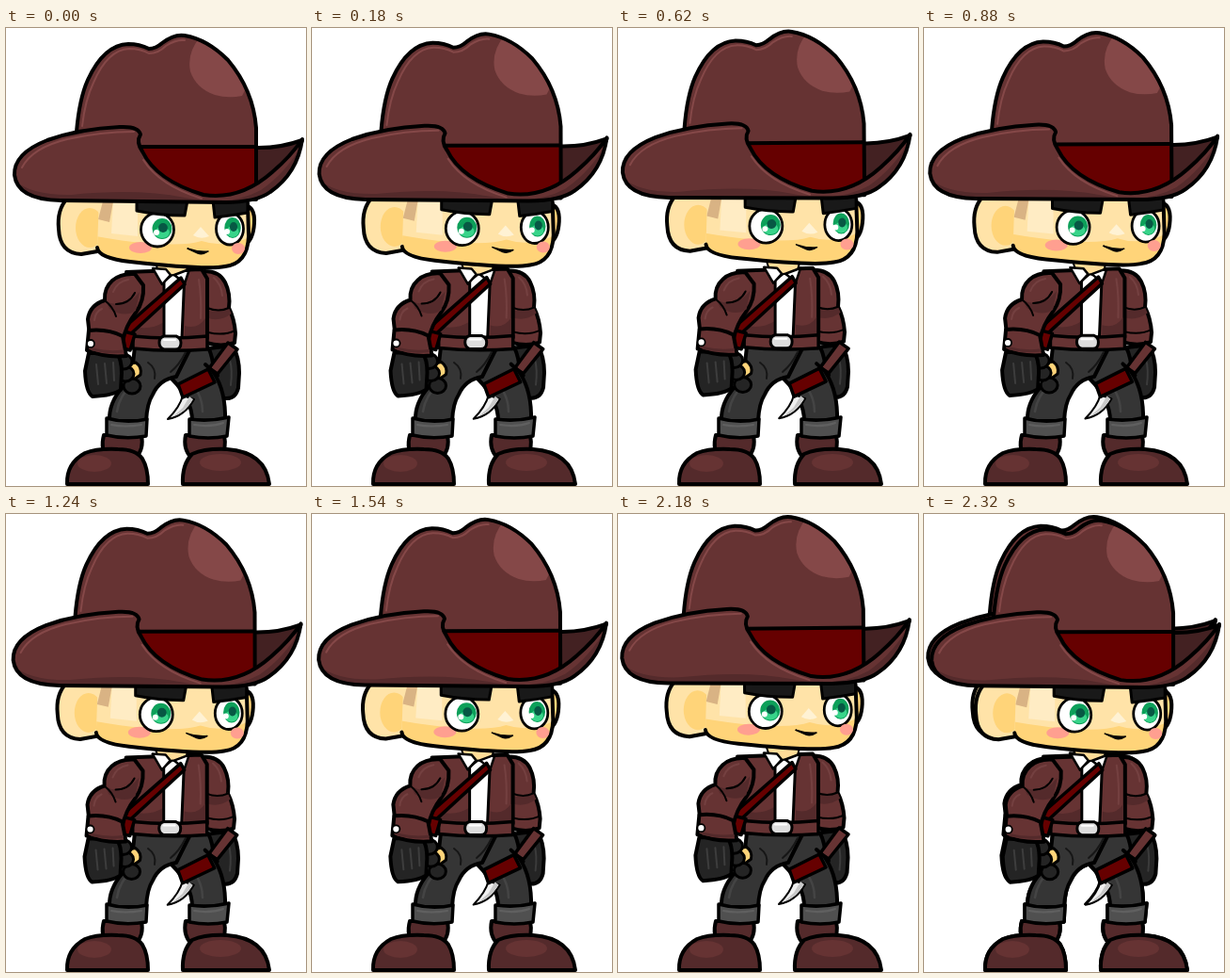
An HTML page with a canvas for the animation above (2.34 s loop, 319 px wide and 486 px high).

```html
<!DOCTYPE html>
<html lang="en">
<head>
<meta charset="utf-8">
<title>Cowboy idle</title>
<style>
html, body { margin: 0; width: 100%; height: 100%; overflow: hidden; background: #fff; }
canvas { display: block; }
</style>
</head>
<body>
<canvas id="stage" width="319" height="486"></canvas>
<script>
const ctx = document.getElementById('stage').getContext('2d');
const LOOP = 2340;
const BROWN = '#663333', SHADE = '#542a2b', DEEP = '#432122', LIGHT = '#854848', RED = '#660000';
const CLOTH = '#353535', GLOVE = '#242424', GREY = '#505050';
const SKIN = '#ffe3a8', PALE = '#ffecc4', GOLD = '#ffd479';
ctx.lineJoin = ctx.lineCap = 'round';

const cache = new Map();
function path(d) {
  if (!cache.has(d)) cache.set(d, new Path2D(d));
  return cache.get(d);
}
function fill(d, color) {
  ctx.fillStyle = color;
  ctx.fill(path(d));
}
function line(d, width = 2, color = '#000') {
  ctx.lineWidth = width;
  ctx.strokeStyle = color;
  ctx.stroke(path(d));
}
function shape(d, color, width = 4) {
  fill(d, color);
  line(d, width);
}
function oval(x, y, rx, ry, color, outline = 0) {
  ctx.beginPath();
  ctx.ellipse(x, y, rx, ry, 0, 0, Math.PI * 2);
  ctx.fillStyle = color;
  ctx.fill();
  if (outline) {
    ctx.lineWidth = outline;
    ctx.strokeStyle = '#000';
    ctx.stroke();
  }
}
function inside(d, draw) {
  ctx.save();
  ctx.clip(path(d));
  draw();
  ctx.restore();
}
function part(x, y, draw) {
  ctx.save();
  ctx.translate(x, y);
  draw();
  ctx.restore();
}

function rightArm() {
  shape('M216 340 L241 337 Q248 349 248 366 L247 382 Q244 394 233 393 L218 386Z', GLOVE);
  line('M238 352 Q241 363 239 379', 2, '#3b3b3b');
  const sleeve = 'M211 258 Q227 258 233 270 Q239 282 237 297 Q243 309 244 324 L243 334 Q229 339 213 334Z';
  shape(sleeve, BROWN);
  inside(sleeve, () => {
    fill('M213 299 Q226 304 240 294 V303 Q226 313 213 307Z', SHADE);
    line('M221 265 Q229 272 230 284', 2, '#744040');
  });
  line('M214 297 Q226 302 237 297 M215 323 Q231 327 244 321', 2);
}

function legs() {
  shape('M174 340 L215 339 Q220 348 221 366 Q234 386 233 417 L198 417 Q198 394 176 372Z', CLOTH);
  shape('M137 338 L196 340 L181 370 Q163 373 156 389 Q150 398 149 417 L110 417 Q109 398 124 381 L134 365Z', CLOTH);
  line('M118 407 Q120 391 136 375 M209 407 Q209 393 201 382', 2.5, '#444');
  line('M191 344 Q184 358 175 365 M151 355 Q160 361 158 372', 2, '#161616');
}

function boots() {
  shape('M104 432 H144 Q147 447 138 456 H108 Q100 447 104 432Z', SHADE);
  shape('M191 432 H232 Q235 447 228 456 H197 Q188 447 191 432Z', SHADE);
  shape('M65 484 Q64 462 84 451 Q97 446 119 447 Q138 447 145 457 Q151 467 151 484Z', SHADE);
  shape('M188 484 Q187 463 198 452 Q212 446 235 447 Q276 450 280 484Z', SHADE);
  oval(94, 462, 18, 9, BROWN);
  oval(228, 461, 22, 9, BROWN);
  shape('M107 414 Q128 420 150 415 L149 433 Q127 437 107 432Z', GREY, 3.5);
  shape('M195 415 Q216 418 237 413 L235 433 Q215 437 195 433Z', GREY, 3.5);
  line('M112 421 Q126 424 144 421 M200 421 Q217 424 231 419', 2, '#606060');
}

function torso() {
  const jacket = 'M128 259 L208 256 L214 266 L214 329 Q180 333 136 328 L130 286Z';
  shape(jacket, BROWN);
  inside(jacket, () => {
    fill('M134 316 Q152 322 168 312 V330 H134Z M190 316 Q204 320 212 308 V331 H190Z', SHADE);
    line('M205 267 Q208 286 207 308', 2, '#744040');
  });
  shape('M168 258 H190 L187 329 H168Z', '#fff', 3);
  shape('M158 246 L195 246 L190 265 L177 262 L166 271Z', '#ffdd98', 2);
  shape('M156 255 L170 256 L175 262 L166 272Z M195 256 L179 262 L190 271Z', '#fff', 2.5);
  shape('M135 327 Q173 331 214 327 V341 Q173 344 135 340Z', BROWN, 3.5);
  shape('M186 265 L190 272 L130 327 L121 322Z', RED, 3.5);
  shape('M118 320 L137 325 L132 342 L118 338Z', RED, 3.5);
  shape('M168 327 H181 Q186 329 186 334 Q186 341 180 341 H168 Q163 339 163 334 Q163 328 168 327Z', '#ddd', 3);
  line('M168 331 H180', 2, '#fff');
}

function knife() {
  shape('M188 390 Q185 402 172 415 Q190 412 200 394Z', '#f0f0f0', 2);
  fill('M188 403 L195 391 L199 394 Q190 408 178 412Z', '#c8c8c8');
  shape('M183 378 L215 362 L222 376 L188 392Z', RED, 3.5);
  shape('M216 361 L236 334 L246 341 L225 367Z', BROWN, 3.5);
  line('M212 357 L225 369', 4);
}

function leftArm() {
  const upper = 'M137 261 Q122 260 113 268 Q104 276 105 289 Q89 294 87 309 L89 327 L124 333 Q127 316 138 302 Q147 290 146 273Z';
  shape(upper, BROWN);
  inside(upper, () => {
    fill('M106 290 Q127 300 142 280 L138 300 Q126 308 110 298Z', SHADE);
    line('M114 280 Q118 269 130 267 M94 310 Q95 301 102 298', 2, '#744040');
  });
  line('M105 289 Q114 296 117 306 M117 293 Q131 293 137 281', 2);
  shape('M128 357 L138 355 Q145 360 143 368 L136 373 L126 368Z', GOLD, 3);
  for (const [x, y] of [[134, 380], [127, 367], [125, 354]]) oval(x, y, 9, 8, GLOVE, 3);
  shape('M88 345 L118 345 Q123 352 123 366 L122 384 Q114 390 92 391 Q85 387 84 364Z', GLOVE);
  line('M96 357 L98 378 M105 356 L107 377 M114 355 L115 374', 2, '#3d3d3d');
  shape('M88 321 Q108 319 124 327 L128 348 Q105 350 86 342Z', BROWN);
  line('M92 341 Q109 345 124 343', 3, SHADE);
  oval(90, 335, 4, 4, '#fff', 1.8);
}

function eye(x, y, rx, ry, look) {
  oval(x, y, rx, ry, '#fff', 2.8);
  const iris = x + look;
  oval(iris, y - 1, rx * .6, 11, '#0da05a');
  oval(iris, y + 3, rx * .45, 6, '#38d48a');
  oval(iris + 1, y - 2, rx * .28, 5, '#075844');
  oval(iris - 6, y + 3, 3, 3, '#fff');
}

function face() {
  shape('M254 188 Q265 190 264 207 Q263 225 254 230Z', GOLD);
  shape('M65 181 Q54 193 56 213 Q57 239 80 240 L103 236 L106 181Z', SKIN);
  oval(89, 212, 15, 21, GOLD);
  const skull = 'M99 181 H257 L258 221 Q257 250 233 253 Q213 257 132 248 Q98 244 97 233Z';
  fill(skull, SKIN);
  inside(skull, () => {
    fill('M96 221 Q124 226 146 228 Q190 232 208 226 Q232 234 259 222 V258 H96Z', GOLD);
    fill('M114 184 H140 V221 L112 218Z', PALE);
    fill('M103 184 H114 L110 206 L98 203Z', '#d9b384');
  });
  line('M257 186 L258 221 Q257 250 233 253 Q213 257 132 248 Q98 244 97 233', 4);
  oval(143, 233, 12, 6, '#ff9f90');
  fill('M207 211 L216 221 Q207 225 199 220Z', '#fff2d4');
  eye(161, 214, 17.5, 18, 5);
  eye(238, 213, 14.5, 17, 3);
  oval(247, 234, 7, 6, '#ff9f90');
  shape('M139 183 H193 L190 199 Q164 199 139 194Z', '#191919', 3);
  shape('M220 183 H257 V196 Q240 199 222 201Z', '#191919', 3);
  shape('M193 234 Q204 238 215 237 Q209 241 204 239Z', '#000', 1.5);
}

function hat() {
  const crown = 'M75 110 Q78 75 87 55 Q104 18 130 17 Q142 17 152 22 Q159 22 166 16 Q179 6 190 8 Q214 12 236 34 Q263 66 266 106 L266 182 L160 178 L140 130Z';
  shape('M264 127 Q290 128 315 119 Q302 158 262 176Z', DEEP, 4);
  fill(crown, BROWN);
  inside(crown, () => {
    fill('M207 9 Q192 26 196 46 Q202 64 222 71 Q236 75 251 72 L268 40 L225 8Z', LIGHT);
    line('M81 104 Q84 77 93 58 Q108 23 131 22 Q143 22 152 27 Q162 27 170 19 Q181 12 190 13', 2, LIGHT);
    fill('M138 126 H270 V184 H138Z', RED);
    line('M138 126 H270', 4);
  });
  line(crown, 4);
  const brim = 'M9 156 Q8 133 44 119 Q78 107 121 105 Q141 104 143 113 Q138 121 145 131 Q160 162 210 177 Q249 183 283 153 Q303 136 315 118 Q310 154 281 174 Q266 185 232 185 L58 183 Q12 182 9 156Z';
  fill(brim, BROWN);
  inside(brim, () => {
    fill('M7 160 Q25 178 70 177 Q140 170 190 180 Q238 190 271 172 Q300 152 317 119 V188 H7Z', SHADE);
    line('M17 148 Q28 127 65 118 Q101 110 136 110', 2, LIGHT);
    line('M146 140 Q163 167 208 181', 2, LIGHT);
  });
  line(brim, 4);
}

function head(pose) {
  ctx.save();
  ctx.translate(160 - 4.2 * pose, 220 - 4.5 * pose);
  ctx.rotate(-.009 * pose);
  ctx.translate(-160, -220);
  face();
  hat();
  ctx.restore();
}

function cowboy(pose) {
  part(-3.5 * pose, -1.5 * pose, rightArm);
  legs();
  boots();
  part(-pose, -1.5 * pose, torso);
  part(-pose, -pose, knife);
  part(-1.6 * pose, -1.8 * pose, leftArm);
  head(pose);
}

const RESET = 2260, START = 100, PEAK = 340, HALF = 950, LOW = .28;
const wave = u => .5 - .5 * Math.cos(Math.PI * u);
const rise = t => wave((t - START + 10) / (PEAK - START + 10));

function poseAt(t) {
  if (t < START) return 0;
  if (t < PEAK) return rise(t);
  if (t < RESET) return 1 - (1 - LOW) * wave((t - PEAK) / HALF);
  return rise(t - RESET + START);
}

function render(now) {
  const t = Math.floor((now % LOOP) / 20) * 20;
  ctx.fillStyle = '#fff';
  ctx.fillRect(0, 0, 319, 486);
  // The raised pose lingers behind the reset.
  if (t >= RESET) cowboy(1);
  cowboy(poseAt(t));
  requestAnimationFrame(render);
}
render(0);
</script>
</body>
</html>
```
